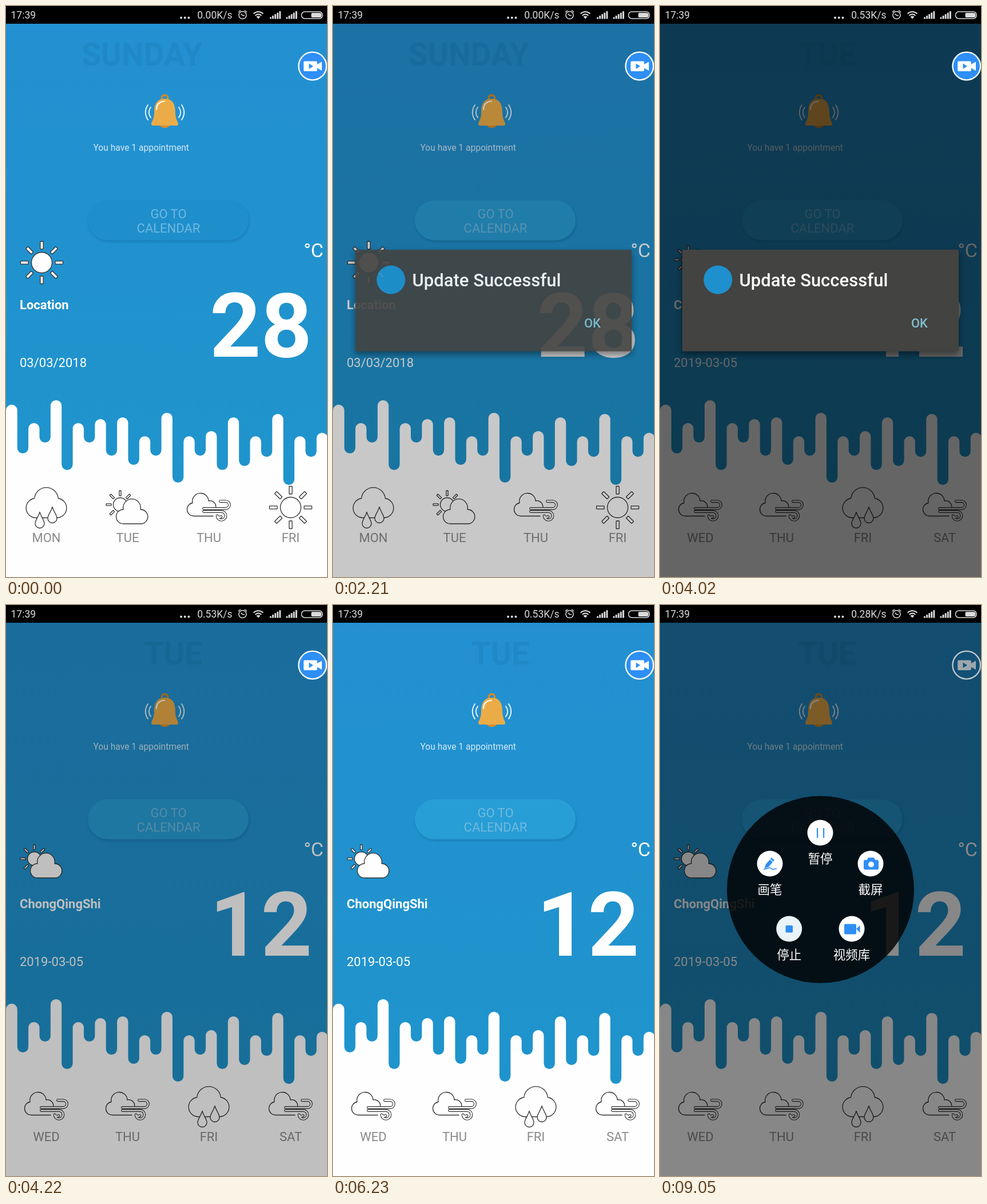
An HTML page for the animation above (9.65 s loop, 561 by 998 pixels).

```html
<!DOCTYPE html>
<html lang="zh-CN">
<head>
<meta charset="utf-8">
<title>Weather update</title>
<style>
html, body { margin: 0; width: 100%; height: 100%; overflow: hidden; background: #000; }
svg { display: block; width: 100%; height: 100%; font-family: Roboto, sans-serif; }
.cjk { font-family: "Noto Sans CJK SC", "Noto Sans CJK", sans-serif; }
.icon { fill: #fefefe; stroke: #333; stroke-width: 1.3; stroke-linejoin: round; }
</style>
</head>
<body>
<svg viewBox="0 0 561 998" preserveAspectRatio="none">
  <defs>
    <linearGradient id="sky" x2="0" y2="1">
      <stop stop-color="#2390d1"/><stop offset="1" stop-color="#1f94cc"/>
    </linearGradient>
    <filter id="soft" x="-20%" y="-30%" width="140%" height="160%"><feGaussianBlur stdDeviation="6"/></filter>
    <filter id="edge" x="-10%" y="-30%" width="120%" height="160%"><feGaussianBlur stdDeviation="2"/></filter>
    <g id="rain" class="icon">
      <path d="M-19 18A17.100 17.100 0 0 1-20.800-16A20.900 20.900 0 0 1 20.800-16A17.100 17.100 0 0 1 19 18Z"/>
      <path id="drop" d="M-11.500 8C-14 17-19.500 22-19.500 28A8 8 0 0 0-3.500 28C-3.500 22-9 17-11.500 8Z"/>
      <use href="#drop" x="22" y="-9"/>
    </g>
    <g id="sun" class="icon"></g>
    <g id="partly" class="icon">
      <g id="smallRays" transform="translate(-13,-5)"></g>
      <circle cx="-13" cy="-5" r="12"/>
      <path d="M-7.500 28.500A12.500 12.500 0 0 1-7.500 3.500A15.300 15.300 0 1 1 22.500 3.500A12.600 12.600 0 0 1 25 28.500Z"/>
    </g>
    <g id="wind" class="icon" stroke-width="1.1">
      <path d="M-26 15A11.600 11.600 0 0 1-28.500-8A14.150 14.150 0 1 1-.500-11.500A10.500 10.500 0 0 1 12 1L8 15Z" stroke="none"/>
      <path d="M8 15H-26A11.600 11.600 0 0 1-28.500-8A14.150 14.150 0 1 1-.500-11.500A10.500 10.500 0 0 1 12 1" fill="none"/>
      <g id="gusts" fill="none" stroke-linecap="round"></g>
    </g>
  </defs>

  <rect width="561" height="998" fill="#fefefe"/>
  <path id="drips" fill="url(#sky)"/>

  <text id="today" x="343" y="104" font-size="55" font-weight="700" text-anchor="end" fill="#1f89c7"/>

  <g id="bell">
    <circle cx="277.500" cy="161" r="5.300" fill="none" stroke="#d48a27" stroke-width="3.400"/>
    <ellipse cx="277.500" cy="207.500" rx="8.500" ry="5.800" fill="#d98d2a"/>
    <path d="M277.500 162C262 162 259 174 259 187C259 198 254 202 254 206.500Q254 209 257 209H298Q301 209 301 206.500C301 202 296 198 296 187C296 174 293 162 277.500 162Z" fill="#ebac48"/>
    <path d="M263 181C263 173 267 167.500 277 166.500" fill="none" stroke="#fff" stroke-width="2.200" stroke-linecap="round"/>
    <path d="M248 173Q239.500 186 248 199M253 177Q246.500 186 253 195M307 173Q315.500 186 307 199M302 177Q308.500 186 302 195" fill="none" stroke="#eef7fc" stroke-width="1.900" stroke-linecap="round"/>
  </g>
  <text x="152.500" y="253" font-size="15.600" fill="#d3e9f6">You have 1 appointment</text>

  <rect x="144" y="342" width="281" height="70" rx="35" fill="#10639a" opacity=".45" filter="url(#edge)"/>
  <rect id="goto" x="143" y="339.500" width="281" height="70" rx="35"/>
  <g font-size="22" text-anchor="middle" fill="#70b9df">
    <text x="284" y="371">GO TO</text><text x="284" y="396">CALENDAR</text>
  </g>

  <use id="nowIcon" x="62.500" y="448.500"/>
  <g fill="#fff">
    <text x="555" y="439" font-size="34" text-anchor="end">°C</text>
    <text id="temp" x="535" y="613" font-size="156" font-weight="700" text-anchor="end"/>
    <text id="place" x="24" y="530" font-size="22" font-weight="700"/>
    <text id="date" x="24" y="631" font-size="22"/>
  </g>
  <g id="days" font-size="22" text-anchor="middle" fill="#8a8a8a"></g>

  <rect id="dim" y="31" width="561" height="967"/>

  <g id="dialog">
    <rect x="39" y="432" width="483" height="177" fill="#000" opacity=".45" filter="url(#soft)"/>
    <rect x="39" y="426" width="483" height="177.500" rx="2" fill="#434341"/>
    <circle cx="101.300" cy="478.500" r="25" fill="#1e90cd"/>
    <text x="138.500" y="490" font-size="31" font-weight="500" fill="#fff">Update Successful</text>
    <text x="439" y="562" font-size="21.800" font-weight="500" fill="#80bfce">OK</text>
  </g>

  <g id="menu">
    <circle cx="280.500" cy="497.300" r="163.500" opacity=".81"/>
    <g id="items" font-size="21.500" text-anchor="middle" fill="#fff"></g>
    <g fill="#2f8ef4">
      <path d="M274 390h2.200v17h-2.200zM285 390h2.200v17h-2.200z"/>
      <path d="M182.500 460.500L185 453L195 441.500L200 446L190 457.500Z"/>
      <path d="M192.500 444.500l5 4.500" stroke="#fff" stroke-width="1.200"/>
      <path d="M181 461.500C188 462 190 457.500 193 459.500S196 463 204 460.500" fill="none" stroke="#2f8ef4" stroke-width="1.700"/>
      <path d="M358 445.500h4l2-4h10l2 4h4q2 0 2 2v13q0 2-2 2h-22q-2 0-2-2v-13q0-2 2-2z"/>
      <circle cx="369" cy="453.500" r="5" fill="#fff"/>
      <rect x="219.500" y="560" width="12.500" height="12.500" rx="1.800"/>
      <path d="M324 557.500h17q2 0 2 2v14q0 2-2 2h-17q-2 0-2-2v-14q0-2 2-2zM343 566l6.500-6v13z"/>
    </g>
  </g>

  <g id="float">
    <circle id="disc" cx="535.700" cy="105" r="24.300" stroke-width="2.300"/>
    <path id="cam" d="M522 96.500h20q1.800 0 1.800 1.800v14q0 1.800-1.800 1.800h-20q-1.800 0-1.800-1.800v-14q0-1.800 1.800-1.800zM543 102.500l9-5v15.500l-9-5z"/>
    <path id="play" d="M529.500 100.500l7.500 4.700-7.500 4.700z"/>
  </g>

  <rect width="561" height="31" fill="#000"/>
  <g fill="#dcdcdc" font-size="17.500">
    <text x="8.500" y="22">17:39</text>
    <text id="speed" x="395.500" y="22" text-anchor="end"/>
    <circle cx="306" cy="20.500" r="2"/><circle cx="312.700" cy="20.500" r="2"/><circle cx="319.400" cy="20.500" r="2"/>
    <g fill="none" stroke="#dcdcdc" stroke-width="1.500">
      <circle cx="413.500" cy="16" r="6.600"/>
      <path d="M410.500 13.500l3 3h3.500M406 11l4-3.500M421 11l-4-3.500"/>
      <rect x="516.500" y="10" width="36.500" height="12" rx="5.500"/>
    </g>
    <path d="M535.500 12h12.500a3.500 3.500 0 0 1 3.500 3.500v1a3.500 3.500 0 0 1-3.500 3.500h-12.500a2 2 0 0 1-2-2v-4a2 2 0 0 1 2-2z"/>
    <path d="M432.500 13.500Q441 6.500 449.500 13.500M435.500 16.800Q441 12 446.500 16.800" fill="none" stroke="#dcdcdc" stroke-width="2"/>
    <path d="M437.500 18.800Q441 16 444.500 18.800L441 22.500Z"/>
    <g id="signal"></g>
  </g>
</svg>
<script>
const $ = id => document.getElementById(id);
const LOOP = 9650;

// Static parts built by rule
function rays(count, near, far, half, from = 0) {
  return Array.from({ length: count }, (_, i) =>
    `<rect x="${-half}" y="${-far}" width="${half * 2}" height="${far - near}" rx=".7" transform="rotate(${(from + i) * 45})"/>`
  ).join("");
}
$("sun").innerHTML = rays(8, 23.5, 37, 2.6) + '<circle r="18"/>';
$("smallRays").innerHTML = rays(5, 15.5, 24.5, 1.6, -3);

const gusts = [
  "M-9 2H29.500A6.400 6.400 0 0 0 29.500-10.800H20",
  "M-9 7H22A7.400 7.400 0 1 1 14.600 14.500A4.500 4.500 0 0 0 21.500 16"
];
$("gusts").innerHTML = gusts.map(d =>
  `<path d="${d}" stroke-width="4.900"/><path d="${d}" stroke="#fefefe" stroke-width="2.700"/>`).join("");

const crests = [697, 729, 689, 729, 722, 719, 752, 711, 752, 743, 719, 752, 713, 752, 746];
const troughs = [782, 763, 811, 763, 786, 802, 786, 833, 786, 811, 804, 788, 837, 788];
function dripPath() {
  const w = 19.37, r = w / 2;
  let d = "M0 31V" + (crests[0] + r);
  crests.forEach((top, i) => {
    const x = (2 * i + 1) * w + 0.4;
    d += `V${top + r}A${r} ${r} 0 0 1 ${x} ${top + r}`;
    if (i < troughs.length) d += `V${troughs[i] - r}A${r} ${r} 0 0 0 ${x + w} ${troughs[i] - r}`;
  });
  return d + "V31Z";
}
$("drips").setAttribute("d", dripPath());

$("signal").innerHTML = [461, 489.5].map(x =>
  [0, 1, 2, 3, 4].map(i =>
    `<rect x="${x + i * 4.1}" y="${19.5 - i * 2.6}" width="2.9" height="${3 + i * 2.6}"/>`).join("")).join("");

$("items").innerHTML = [
  [280, 398, "暂停"], [192, 452, "画笔"], [368, 452, "截屏"],
  [225.7, 566, "停止", "stop"], [335, 566, "视频库"]
].map(([x, y, label, id]) =>
  `<circle ${id ? `id="${id}"` : ""} cx="${x}" cy="${y}" r="22.5"/>
   <text class="cjk" x="${x}" y="${y + 53.3}">${label}</text>`).join("");

const dayX = [70.5, 212.5, 354.5, 497.5];
const before = {
  today: "SUNDAY", place: "Location", date: "03/03/2018", temp: "28", icon: "sun",
  days: [["MON", "rain"], ["TUE", "partly"], ["THU", "wind"], ["FRI", "sun"]]
};
const after = {
  today: "TUE", place: "ChongQingShi", date: "2019-03-05", temp: "12", icon: "partly",
  days: [["WED", "wind"], ["THU", "wind"], ["FRI", "rain"], ["SAT", "wind"]]
};

let shown;
function showWeather(data) {
  if (shown === data) return;
  shown = data;
  for (const key of ["today", "place", "date", "temp"]) $(key).textContent = data[key];
  $("nowIcon").setAttribute("href", "#" + data.icon);
  $("days").innerHTML = data.days.map(([name, icon], i) =>
    `<use href="#${icon}" x="${dayX[i]}" y="876.5"/><text x="${dayX[i]}" y="937">${name}</text>`).join("");
}

// Value of the last [time, value] step reached
const step = (t, steps) => steps.reduce((v, [at, next]) => t >= at ? next : v, steps[0][1]);
const paint = (id, fill) => $(id).setAttribute("fill", fill);
const fade = (id, value) => $(id).setAttribute("opacity", value);

function draw(t) {
  showWeather(t < 2410 ? before : after);
  paint("goto", step(t, [[0, "#1f8fcc"], [2210, "#289ed6"]]));
  fade("dim", step(t, [[0, 0], [2210, .21], [2410, .54], [2610, .6], [4220, .25], [4420, 0], [6440, .47]]));
  fade("dialog", step(t, [[0, 0], [2210, .9], [2410, 1], [4220, 0]]));
  fade("menu", step(t, [[0, 0], [6440, 1]]));
  paint("stop", step(t, [[0, "#fff"], [9050, "#e8f4f8"]]));
  $("speed").textContent = step(t, [[0, "0.00K/s"], [3420, "0.53K/s"], [8450, "0.28K/s"]]);

  const open = t >= 6440;
  const blue = open ? "#125076" : "#2e8ff6";
  paint("disc", blue);
  paint("play", blue);
  paint("cam", open ? "#9da7ac" : "#fff");
  $("disc").setAttribute("stroke", open ? "#c0c8cc" : "#fff");
}

function tick() {
  draw(performance.now() % LOOP);
  requestAnimationFrame(tick);
}
tick();
</script>
</body>
</html>
```
